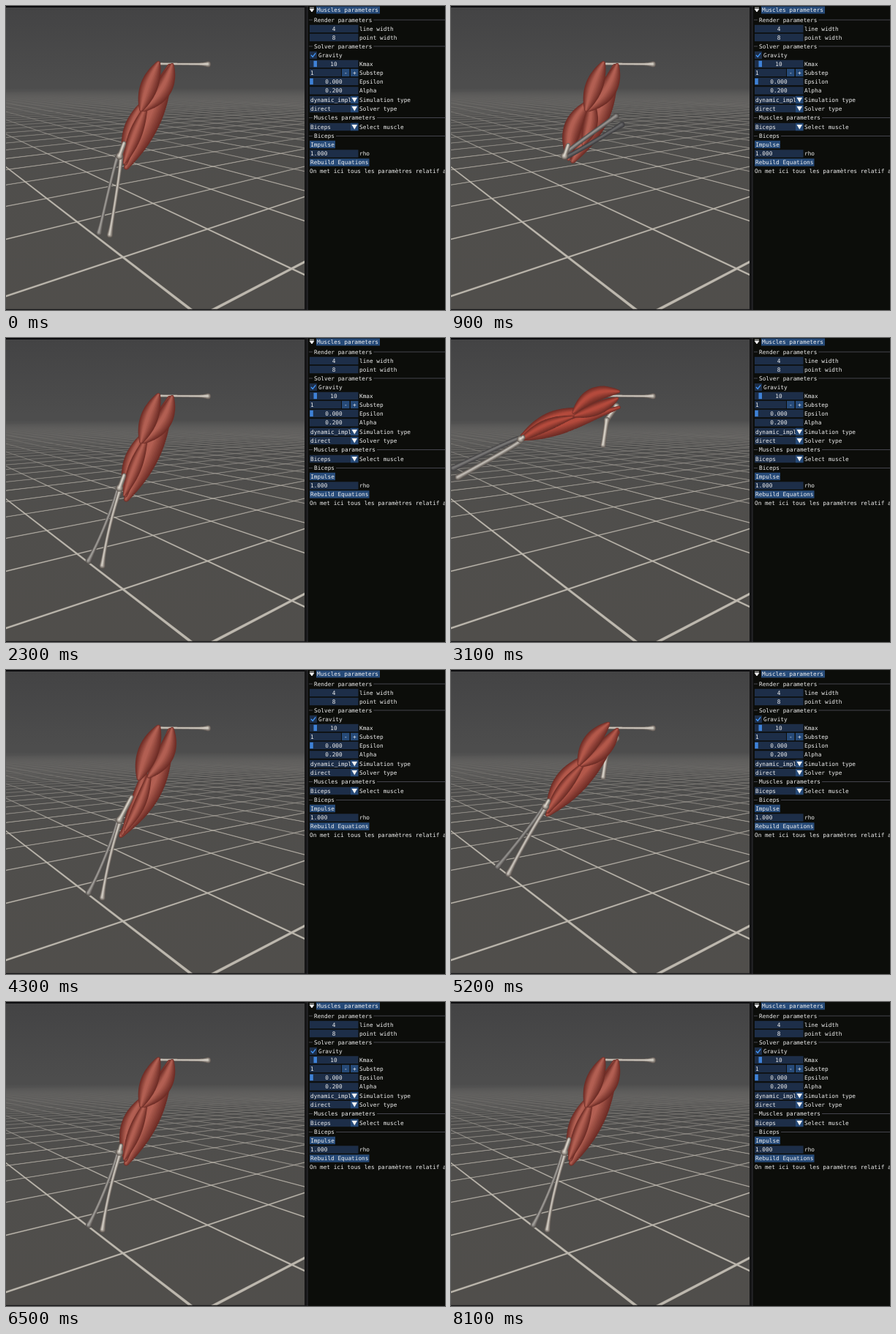
These frames come from a looping animation (600x415 px, 8200 ms). An HTML page with a canvas:

```html
<!DOCTYPE html>
<html lang="en">
<head>
<meta charset="utf-8">
<title>Muscle simulation</title>
<style>
html, body { margin: 0; width: 100%; height: 100%; overflow: hidden; background: #0c0d0a; }
canvas, svg { position: absolute; left: 0; top: 0; }
text { font: 7.75px "DejaVu Sans Mono", "Liberation Mono", monospace; fill: #f0f0f0; white-space: pre; }
</style>
</head>
<body>
<canvas id="view" width="408" height="415"></canvas>
<svg id="panel" width="600" height="415"></svg>
<script>
const LOOP = 8200, STEP = 100;
const ctx = document.getElementById('view').getContext('2d');
const lerp = (a, b, u) => a + (b - a) * u;
const mixList = (a, b, u) => a.map((v, i) => lerp(v, b[i], u));
const rgb = c => `rgb(${c.map(Math.round)})`;

// ---------- side panel ----------
const FIELD = '#1d2e48', BUTTON = '#264a78', GRAB = '#3f82d8';
const parts = [];
const rect = (x, y, w, h, fill) => parts.push(`<rect x="${x}" y="${y}" width="${w}" height="${h}" fill="${fill}"/>`);
const path = (d, attrs) => parts.push(`<path d="${d}" ${attrs}/>`);
const label = (x, y, s, anchor = 'start') => parts.push(`<text x="${x}" y="${y + 2.7}" text-anchor="${anchor}">${s}</text>`);
const field = (y, value, name, w = 66.5) => {
  rect(415, y - 5.2, w, 10.4, FIELD);
  label(416, y, value);
  label(483, y, name);
};
const slider = (y, value, name, grab) => {
  rect(415, y - 5.2, 66.5, 10.4, FIELD);
  if (grab) rect(grab, y - 4.2, 4.5, 8.4, GRAB);
  label(448, y, value, 'middle');
  label(483, y, name);
};
const combo = (y, value, name) => {
  field(y, value, name);
  rect(471, y - 5.2, 10.5, 10.4, BUTTON);
  path(`M472.5 ${y - 3}h7.6l-3.8 6.4z`, 'fill="#f4f4f4"');
};
const button = (x, y, w, s) => {
  rect(x, y - 5.2, w, 10.4, BUTTON);
  label(x + w / 2, y, s, 'middle');
};
const section = (y, s) => {
  path(`M414 ${y}h5M${423 + s.length * 4.67} ${y}H600`, 'stroke="#44444c"');
  label(421, y, s);
};

rect(0, 0, 600, 2, '#0c0c0e');
rect(408, 0, 4, 415, '#151516');
rect(412, 0, 188, 415, '#0c0d0a');
rect(411.5, 0, 1, 415, '#303036');
rect(0, 413.8, 408, 1.2, '#19191b');
rect(424, 0.5, 87, 10, BUTTON);
path('M415 2.2h6M415 4h6l-3 4z', 'fill="#f4f4f4" stroke="#f4f4f4" stroke-width=".8"');
label(425, 5.5, 'Muscles parameters');
section(19, 'Render parameters');
slider(31, '4', 'line width');
slider(43, '8', 'point width');
section(55, 'Solver parameters');
rect(415, 62, 10, 10.2, FIELD);
path('M417 67l2.2 2.4l4-5', 'fill="none" stroke="#4296fa" stroke-width="1.4"');
label(427, 67, 'Gravity');
slider(79, '10', 'Kmax', 420.5);
field(91, '1', 'Substep', 43);
button(459, 91, 10.5, '-');
button(471, 91, 10.5, '+');
slider(103, '0.000', 'Epsilon', 415.3);
slider(115.5, '0.200', 'Alpha');
combo(128, 'dynamic_impl', 'Simulation type');
combo(140, 'direct', 'Solver type');
section(152.5, 'Muscles parameters');
combo(165, 'Biceps', 'Select muscle');
section(177.5, 'Biceps');
button(415, 189, 35, 'Impulse');
field(201.5, '1.000', 'rho');
button(415, 213.5, 81.5, 'Rebuild Equations');
label(415, 225, 'On met ici tous les paramètres relatif a');
document.getElementById('panel').innerHTML = parts.join('');

// ---------- floor ----------
const HORIZON = 105;

function verticalFade(...stops) {
  const g = ctx.createLinearGradient(0, 0, 0, 415);
  for (const [y, c] of stops) g.addColorStop(y / 415, c);
  return g;
}

// Parallel floor lines meet at (vanish, HORIZON); they are evenly spaced in 1 / depth along x = edge.
function floorLines(vanish, edge, first, gap) {
  const y = n => HORIZON + 1 / (first + gap * n);
  for (let n = -1; n < 60; n++) {
    ctx.beginPath();
    ctx.moveTo(vanish, HORIZON);
    for (const h of [-0.011, 0.011]) {
      const k = 2;
      ctx.lineTo(lerp(vanish, edge, k), lerp(HORIZON, y(n + h), k));
    }
    ctx.closePath();
    ctx.fill();
    ctx.stroke();
  }
}

function drawFloor() {
  ctx.fillStyle = verticalFade([0, '#434344'], [HORIZON, '#4d4d4d'], [150, '#4f4e4c'], [415, '#504e4b']);
  ctx.fillRect(0, 0, 408, 415);
  ctx.fillStyle = '#bdb8ae';
  ctx.strokeStyle = 'rgba(189,184,174,.4)';
  ctx.lineWidth = 0.8;
  floorLines(876, 0, 0.003436, 0.00125);
  floorLines(-149, 408, 0.00233, 0.00149);
  const fog = a => `rgba(77,77,77,${a})`;
  ctx.fillStyle = verticalFade([100, fog(1)], [112, fog(1)], [135, fog(0.65)], [210, fog(0)]);
  ctx.fillRect(0, HORIZON - 3, 408, 110);
}

// ---------- arm ----------
const FLESH = [[110, 45, 38], [178, 95, 82]];
const BONE = [[98, 90, 84], [218, 212, 202]];
const SHADE = [[58, 58, 61], [98, 98, 100]];
const SHOULDER = [224, 82], UPPER = 142;

// Shaded tube: at(u) gives the centre and radius(u) the thickness, u from 0 to 1.
function tube(at, radius, [edge, mid], layers = 8, n = 110) {
  for (let k = 0; k < layers; k++) {
    const f = k / (layers - 1);
    ctx.fillStyle = rgb(mixList(edge, mid, f));
    ctx.beginPath();
    for (let i = 0; i <= n; i++) {
      const [x, y] = at(i / n), r = radius(i / n);
      const cx = x - 0.14 * r * f, cy = y - 0.1 * r * f, q = r * (1 - 0.8 * f);
      ctx.moveTo(cx + q, cy);
      ctx.arc(cx, cy, q, 0, 7);
    }
    ctx.fill();
  }
}

// Thin shaft with thicker ends.
const shaft = (start, thin, end) => u => thin + ((u < 0.5 ? start : end) - thin) * Math.abs(2 * u - 1) ** 5;
const bone = (a, b, radius, col = BONE) => tube(u => mixList(a, b, u), radius, col, 6);

// Point at `along` in direction deg from origin, shifted sideways by `off`.
function offset([x, y], deg, along, off) {
  const a = deg * Math.PI / 180, c = Math.cos(a), s = Math.sin(a);
  return [x + c * along - s * off, y + s * along + c * off];
}

function drawArm({ lift, flex, slack, bulge, twist }) {
  const by = (base, l = 0, f = 0, s = 0, b = 0) => base + l * lift + f * flex + s * slack + b * bulge;
  const onArm = (s, d) => offset(SHOULDER, by(116, 40), s * UPPER, d);
  const flesh = [FLESH[0], mixList(FLESH[1], [180, 74, 60], lift)];

  // Spindle from (s0, d0) to (s1, d1) along the upper arm, bowed sideways.
  const muscle = (s0, d0, s1, d1, r, bow, skew = 1) => tube(
    u => onArm(lerp(s0, s1, u), lerp(d0, d1, u) + bow * Math.sin(Math.PI * u)),
    u => r * (0.2 + 0.8 * Math.sin(Math.PI * u ** skew) ** 0.9), flesh);

  bone([226, 93], [213, 112], shaft(4.5, 3.5, 4));
  bone([213, 112], [208, 146], shaft(4, 3.2, 3.8));
  bone([212, 79], [276, 79.5], shaft(2, 1.8, 4));

  muscle(0, by(0, -14), by(1.06, -0.06, -0.06, 0.06), by(-7, 9, 2, 4), by(16, -5, -1, -2), by(-3, 3, -4, -9), by(1, 0.4));
  muscle(by(0.42, -0.15), by(11, -13, 0, -4), by(1.03, -0.03, -0.03, 0.07), by(-4, 6, 5), by(11, -1, 1, -3, 2), by(5, 4, 4, -8, 2));
  muscle(by(0.45, 0, -0.05), by(5, -5, 2, -6), by(1.03, -0.03, -0.22, 0.03), by(-2, 2, -6, -3), by(9, -1, 1, -1), by(0, 4, -4, -4));
  muscle(-0.02, -2, by(0.49, -0.07), by(6, -6, 0, -8), by(12, -3), by(-7, 5));
  muscle(by(0.02, -0.08), by(16, -10), by(0.5, -0.08, 0, 0.05), by(9, -4), by(12, -2, 0, 2), by(1, 9));

  const elbow = onArm(0.99, by(8, -7));
  const deg = by(107.8, 45, -141) - 6.8 * twist, len = by(108, -8, -19);
  for (const side of [1, -1]) {
    const dark = Math.min(1, by(0.25 + 0.2 * side, 0.25 + 0.1 * side, 0.5));
    const power = lerp(2.2, 0.5, Math.max(twist, lift, flex));
    const spread = by(8.5, -3, -3) - 2.5 * twist;
    tube(u => offset(elbow, deg, u * len, side * (1.5 + spread * u ** power)),
      shaft(3.5, by(2.4, 0.8, 0.5), 4), BONE.map((c, i) => mixList(c, SHADE[i], dark)), 6);
  }
  bone(onArm(by(0.86, 0.1, 0.02, -0.12, 0.08), by(10, -8, 0, -3)), elbow, shaft(2.8, 3.2, 5));
}

// ---------- motion ----------
const REST = { lift: 0, flex: 0, slack: 0, bulge: 0, twist: 0 };
const keys = [
  [0, { twist: 1 }], [900, { flex: 1 }], [1800, {}], [2300, {}], [3100, { lift: 1 }],
  [3350, { lift: 1.06 }], [3650, { lift: 1 }], [4250, { slack: 1 }], [4400, { slack: 1 }],
  [4950, { lift: 0.62 }], [5500, { bulge: 1 }], [5600, { bulge: 1 }], [6000, {}],
  [6400, { bulge: 1 }], [6800, { twist: 0.15 }], [7250, {}], [7650, { bulge: 1 }], [8100, {}], [LOOP, {}]
].map(([t, p]) => [t, { ...REST, ...p }]);

function poseAt(t) {
  const k = keys.findIndex(([end], i) => i && t <= end);
  const [t0, p] = keys[k - 1], [t1, q] = keys[k];
  const u = (t - t0) / (t1 - t0), ease = u * u * (3 - 2 * u);
  return Object.fromEntries(Object.keys(REST).map(name => [name, lerp(p[name], q[name], ease)]));
}

let shown = -1;
const start = performance.now();
function tick(now) {
  const t = Math.floor(Math.max(0, now - start) % LOOP / STEP) * STEP;
  if (t !== shown) {
    shown = t;
    drawFloor();
    drawArm(poseAt(t));
  }
  requestAnimationFrame(tick);
}
tick(start);
</script>
</body>
</html>
```
